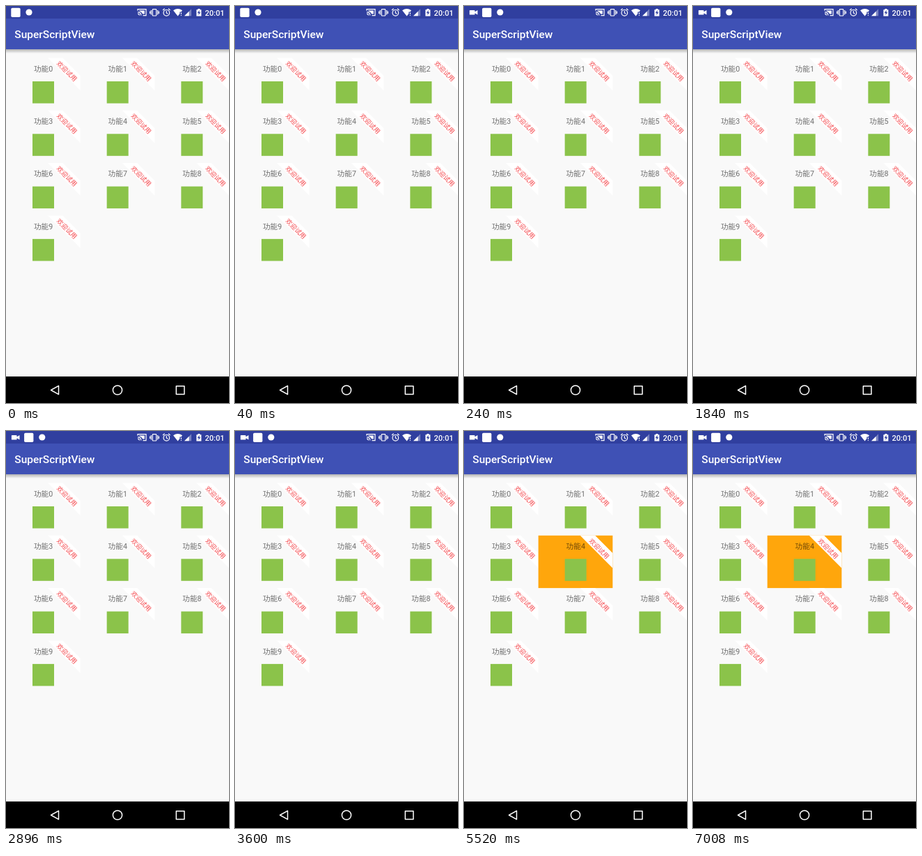
Recreate the animation shown at these times as an HTML page. Size 320 by 569 pixels, loop 8 s.

```html
<!DOCTYPE html>
<html lang="zh">
<head>
<meta charset="utf-8">
<title>SuperScriptView</title>
<style>
  html, body { margin: 0; width: 100%; height: 100%; overflow: hidden; background: #f9f9f9; }
  svg { display: block; width: 100%; height: 100%; }
  text { font-family: Roboto, "Noto Sans CJK SC", "Noto Sans CJK", sans-serif; }
  .label { font-size: 10.65px; fill: #000; fill-opacity: .56; text-anchor: middle; }
  .ribbon { font-size: 9.1px; fill: #f4454a; text-anchor: middle; }
  .bar { font-weight: 500; fill: #fff; }
  .line { fill: none; stroke: #fff; stroke-width: 1.2; }
</style>
</head>
<body>
<svg viewBox="0 0 320 569">
  <defs>
    <linearGradient id="shadow" x2="0" y2="1">
      <stop stop-color="#000" stop-opacity=".28"/>
      <stop offset="1" stop-color="#000" stop-opacity="0"/>
    </linearGradient>
  </defs>
  <rect width="320" height="569" fill="#f9f9f9"/>
  <g id="grid"></g>

  <rect y="62" width="320" height="6" fill="url(#shadow)"/>
  <rect y="18" width="320" height="44" fill="#3f51b5"/>
  <rect width="320" height="18" fill="#303f9f"/>
  <text class="bar" x="12.3" y="46.2" font-size="15.5">SuperScriptView</text>

  <!-- notifications -->
  <path id="camera" fill="#fff" d="M8.6 6h6.2q.7 0 .7.7v1.6l4-2.2v6.4l-4-2.2v1.600q0 .7-.7.7H8.600q-.7 0-.7-.7V6.700q0-.7.7-.7z"/>
  <g id="notices" fill="#fff">
    <rect x="7.3" y="2.700" width="13.300" height="13.300" rx="1.800"/>
    <circle cx="33" cy="9" r="4.600"/>
  </g>

  <!-- system status -->
  <g class="line">
    <path d="M189 6.800V4.600h12v9h-4.500M189 8.800q4.800 0 4.800 4.800M189 11.200q2.400 0 2.400 2.400"/>
    <path d="M191.200 6.600h7.600v4.900h-2.600q-1.200-3-5-4.200z" fill="#fff" stroke="none"/>
    <rect x="210.300" y="4.600" width="5.400" height="9.400" rx=".8"/>
    <path d="M208.300 6v6.500M217.700 6v6.500M206.600 7.600v3.300M219.400 7.600v3.300"/>
    <circle cx="230.300" cy="9.800" r="4.300"/>
    <path d="M230.300 7v3l2 1.300M225 6l2.600-2.200M235.600 6L233 3.800"/>
  </g>
  <path fill="#fff" d="M240 6.300q6.500-4.600 13 0l-1.700 2.200h-2v2.500L246.500 14.500z"/>
  <path class="line" d="M251.400 9.600v2.200M251.400 12.900v1.200"/>
  <path fill="#fff" fill-opacity=".35" d="M256 14.300L266 4.300v10z"/>
  <path fill="#fff" d="M256 14.300l6.600-6.600v6.600z"/>
  <path fill="#fff" d="M273.300 5.200h2v-1.200h3v1.200h2v9.300h-7z"/>
  <path fill="#303f9f" d="M277.500 6l-2.800 4h1.700v3l2.700-4h-1.600z"/>
  <text class="bar" x="285.500" y="13.500" font-size="11">20:01</text>

  <!-- navigation -->
  <rect y="531" width="320" height="38" fill="#000"/>
  <g class="line" stroke-linejoin="round" style="stroke-width:1.500">
    <path d="M75.500 544.300v12.400l-11-6.200z"/>
    <circle cx="160" cy="550.500" r="6.600"/>
    <rect x="244.300" y="544.800" width="11.600" height="11.600"/>
  </g>
</svg>
<script>
const LOOP = 8000, CAMERA_ON = 80, PRESS_AT = 5520;
const CELL_W = 320 / 3, CELL_H = 75.3, TOP = 74.5, PRESSED = 4;
const $ = id => document.getElementById(id);

const cell = i => `
  <g transform="translate(${(i % 3) * CELL_W} ${TOP + Math.floor(i / 3) * CELL_H})">
    <rect class="back" width="${CELL_W}" height="${CELL_H}" fill="#ffa60c" visibility="hidden"/>
    <text class="label" x="53.6" y="19.3">功能${i}</text>
    <rect x="38" y="33.5" width="31" height="31.5" fill="#8bc34a"/>
    <path d="M60 0h21.5L${CELL_W} ${CELL_W - 81.5}V${CELL_W - 60}z" fill="#fff"/>
    <text class="ribbon" transform="translate(87.3 18.9) rotate(45)" y="3.3">欢迎试用</text>
  </g>`;

$("grid").innerHTML = Array.from({ length: 10 }, (_, i) => cell(i)).join("");
const highlight = document.querySelectorAll(".back")[PRESSED];
const show = (el, on) => el.setAttribute("visibility", on ? "visible" : "hidden");

function draw(now) {
  const t = now % LOOP;
  const recording = t >= CAMERA_ON;
  show($("camera"), recording);
  $("notices").setAttribute("transform", `translate(${recording ? 18.8 : 0} 0)`);
  show(highlight, t >= PRESS_AT);
}

let start;
function tick(now) {
  start ??= now;
  draw(now - start);
  requestAnimationFrame(tick);
}
draw(0);
requestAnimationFrame(tick);
</script>
</body>
</html>
```
